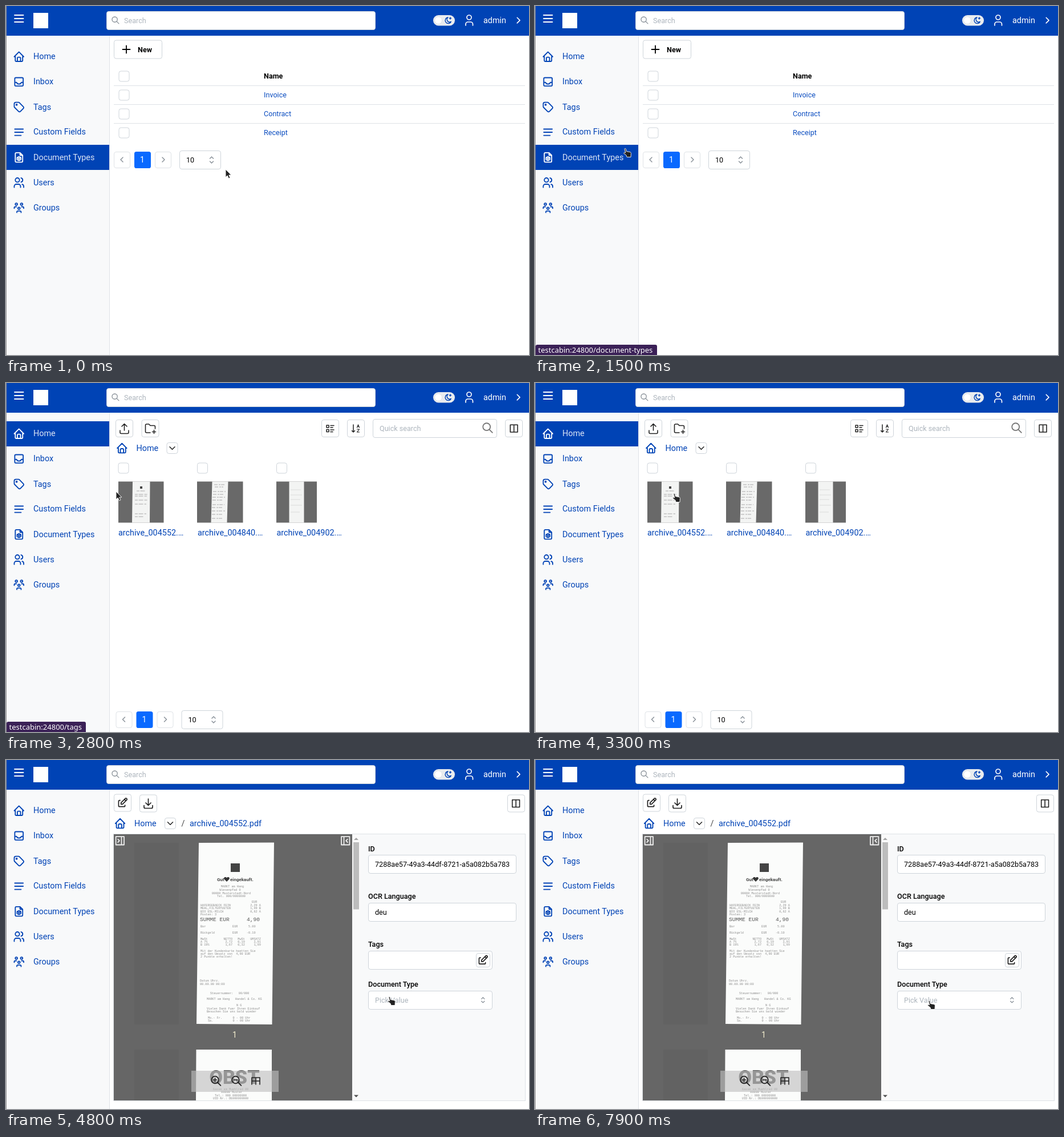
Animation of 917 by 611 pixels, one loop 8000 ms. Source, as an HTML page:

```html
<!DOCTYPE html>
<html lang="en">
<head>
<meta charset="utf-8">
<title>Document manager</title>
<style>
html, body { margin: 0; width: 100%; height: 100%; overflow: hidden; background: #fff; }
svg { display: block; width: 917px; height: 611px; }
text { font: 12.6px Roboto, sans-serif; fill: #000; white-space: pre; }
.nav text, .crumb text, .name { font-size: 14.4px; fill: #0043b5; }
.link { fill: #0b4dc0; }
.strong { font-weight: 700; }
.label text { font-weight: 500; }
.hint { fill: #adb5bd; }
.ico { fill: none; stroke-width: 2; stroke-linecap: round; stroke-linejoin: round; stroke: #222; }
.blue { stroke: #0043b5; }
.white { stroke: #fff; }
.box { fill: #fff; stroke: #ced4da; }
.faint { fill: #fff; stroke: #dee2e6; }
.rule { stroke: #dee2e6; }
.active rect { fill: #0043b5; }
.active text { fill: #dbe4f5; }
.active .ico { stroke: #fff; }
.mid { text-anchor: middle; }
.paper text { font: 5.2px "Liberation Mono", monospace; fill: #8c8c8c; }
.paper .total { font-size: 9.6px; fill: #555; }
.paper .motto { font: 700 8px Roboto, sans-serif; fill: #444; }
.paper .brand { font: 900 34px Roboto, sans-serif; fill: #555; }
.status rect { fill: #3b2157; }
.status text { font: 13px "Noto Sans", sans-serif; fill: #fff; }

/* 1.25% of the loop is one 100 ms tick */
.show { visibility: hidden; animation: 8s step-end -5ms infinite; }
#docs { animation-name: docs; }
#files { animation-name: files; }
#viewer { animation-name: viewer; }
#u-docs { animation-name: u-docs; }
#u-fields { animation-name: u-fields; }
#u-tags { animation-name: u-tags; }
#u-inbox { animation-name: u-inbox; }
#u-home { animation-name: u-home; }
#arrow { animation-name: arrow; }
#hand { animation-name: hand; }
#cursor { animation: move 8s linear -5ms infinite; }

@keyframes docs { 0% { visibility: visible } 28.75%, to { visibility: hidden } }
@keyframes files { 0%, 45%, to { visibility: hidden } 28.75% { visibility: visible } }
@keyframes viewer { 0% { visibility: hidden } 45%, to { visibility: visible } }
@keyframes u-docs { 0%, 20%, to { visibility: hidden } 17.5% { visibility: visible } }
@keyframes u-fields { 0%, 22.5%, to { visibility: hidden } 20% { visibility: visible } }
@keyframes u-tags { 0%, 23.75%, 40%, to { visibility: hidden } 22.5%, 33.75% { visibility: visible } }
@keyframes u-inbox { 0%, 26.25%, 33.75%, to { visibility: hidden } 23.75%, 31.25% { visibility: visible } }
@keyframes u-home { 0%, 31.25%, to { visibility: hidden } 26.25% { visibility: visible } }
@keyframes arrow {
  0%, 35%, 45%, 71.25%, 77.5% { visibility: visible }
  11.25%, 36.25%, 60%, 73.75%, 97.5%, to { visibility: hidden }
}
@keyframes hand {
  0%, 35%, 45%, 71.25%, 77.5% { visibility: hidden }
  11.25%, 36.25%, 60%, 73.75%, 97.5%, to { visibility: visible }
}
@keyframes move {
  0% { transform: translate(385px, 286px); animation-timing-function: step-end }
  1.25% { transform: translate(385px, 286px); animation-timing-function: steps(5) }
  7.5% { transform: translate(240px, 262px); animation-timing-function: steps(4) }
  12.5% { transform: translate(158px, 246px); animation-timing-function: step-end }
  13.75% { transform: translate(149px, 245px); animation-timing-function: step-end }
  15% { transform: translate(157px, 249px); animation-timing-function: step-end }
  18.75% { transform: translate(157px, 249px); animation-timing-function: steps(7) }
  27.5% { transform: translate(96px, 71px); animation-timing-function: step-end }
  28.75% { transform: translate(96px, 72px); animation-timing-function: steps(5) }
  35% { transform: translate(193px, 190px); animation-timing-function: steps(3) }
  38.75% { transform: translate(236px, 196px); animation-timing-function: steps(2) }
  41.25% { transform: translate(243px, 193px); animation-timing-function: step-end }
  45% { transform: translate(243px, 193px); animation-timing-function: steps(8) }
  55% { transform: translate(601px, 362px); animation-timing-function: steps(4) }
  60% { transform: translate(671px, 414px); animation-timing-function: steps(5) }
  66.25% { transform: translate(672px, 416px); animation-timing-function: steps(5) }
  72.5% { transform: translate(690px, 448px); animation-timing-function: steps(2) }
  75% { transform: translate(660px, 425px); animation-timing-function: steps(2) }
  77.5% { transform: translate(625px, 418px); animation-timing-function: step-end }
  78.75% { transform: translate(421px, 215px); animation-timing-function: steps(3) }
  82.5% { transform: translate(279px, 72px); animation-timing-function: steps(5) }
  88.75% { transform: translate(516px, 352px); animation-timing-function: steps(4) }
  93.75% { transform: translate(640px, 500px); animation-timing-function: steps(2) }
  96.25% { transform: translate(692px, 440px); animation-timing-function: steps(2) }
  98.75%, to { transform: translate(690px, 421px); animation-timing-function: step-end }
}
</style>
</head>
<body>
<svg viewBox="0 0 917 611">
<defs>
  <path id="home" d="M5 12H3l9-9 9 9h-2M5 12v7a2 2 0 0 0 2 2h10a2 2 0 0 0 2-2v-7M9 21v-6a2 2 0 0 1 2-2h2a2 2 0 0 1 2 2v6"/>
  <path id="inbox" d="M4 6a2 2 0 0 1 2-2h12a2 2 0 0 1 2 2v12a2 2 0 0 1-2 2H6a2 2 0 0 1-2-2zM4 13h3l3 3h4l3-3h3"/>
  <path id="tag" d="M6.5 7.5a1 1 0 1 0 2 0a1 1 0 1 0-2 0M3 6v5.2a2 2 0 0 0 .6 1.4l7.7 7.7a2.4 2.4 0 0 0 3.4 0l5.6-5.6a2.4 2.4 0 0 0 0-3.4l-7.7-7.7A2 2 0 0 0 11.2 3H6a3 3 0 0 0-3 3z"/>
  <path id="lines" d="M4 6h16M4 12h16M4 18h12"/>
  <path id="file" d="M14 3v4a1 1 0 0 0 1 1h4M17 21H7a2 2 0 0 1-2-2V5a2 2 0 0 1 2-2h7l5 5v11a2 2 0 0 1-2 2zM12 10.5l3.5 1.8v3.7L12 17.8 8.5 16v-3.7zM8.5 12.3L12 14l3.5-1.7M12 14v3.8"/>
  <path id="users" d="M5 7a4 4 0 1 0 8 0a4 4 0 1 0-8 0M3 21v-2a4 4 0 0 1 4-4h4a4 4 0 0 1 4 4v2M16 3.1a4 4 0 0 1 0 7.8M21 21v-2a4 4 0 0 0-3-3.8"/>
  <path id="group" d="M10 13a2 2 0 1 0 4 0a2 2 0 0 0-4 0M8 21v-1a2 2 0 0 1 2-2h4a2 2 0 0 1 2 2v1M15 5a2 2 0 1 0 4 0a2 2 0 0 0-4 0M17 10h2a2 2 0 0 1 2 2v1M5 5a2 2 0 1 0 4 0a2 2 0 0 0-4 0M3 13v-1a2 2 0 0 1 2-2h2"/>
  <path id="glass" d="M3 10a7 7 0 1 0 14 0a7 7 0 1 0-14 0M21 21l-6-6"/>
  <path id="edit" d="M7 7H6a2 2 0 0 0-2 2v9a2 2 0 0 0 2 2h9a2 2 0 0 0 2-2v-1M20.4 6.6a2.1 2.1 0 0 0-3-3L9 12v3h3zM16 5l3 3"/>
  <path id="columns" d="M4 4h16v16H4zM12 4v16"/>
  <path id="panel" d="M4 4h16v16H4zM15 4v16M8 9l3 3-3 3"/>
  <path id="updown" d="M8 9l4-4 4 4M8 15l4 4 4-4"/>
  <path id="down" d="M6 9l6 6 6-6"/>
  <path id="right" d="M9 6l6 6-6 6"/>
  <rect id="check" class="box" width="18" height="18" rx="3.6"/>
  <rect id="btn" class="box" width="30" height="30" rx="3.6"/>
  <g id="pager">
    <rect class="faint" x="189.5" y="255.5" width="28" height="28" rx="3.6"/>
    <rect x="225" y="255" width="29" height="29" rx="3.6" fill="#0969ff"/>
    <rect class="faint" x="261.5" y="255.5" width="28" height="28" rx="3.6"/>
    <rect class="box" x="304.5" y="253.5" width="72" height="32" rx="3.6"/>
    <path class="ico" style="stroke:#868e96;stroke-width:1.4" d="M205 265l-4 4 4 4M274 265l4 4-4 4M357.500 267l3-3 3 3M357.500 272l3 3 3-3"/>
    <text class="mid" x="239" y="273.500" style="fill:#fff;font-size:14px">1</text>
    <text x="316" y="273.500">10</text>
  </g>
</defs>

<rect width="917" height="611" fill="#fff"/>
<rect y="52" width="181" height="559" fill="#f8f9fa"/>
<path class="rule" d="M181.500 52v559"/>

<g class="nav">
  <text x="48" y="93">Home</text>
  <text x="48" y="137">Inbox</text>
  <text x="48" y="181.500">Tags</text>
  <text x="48" y="225">Custom Fields</text>
  <text x="48" y="269.500">Document Types</text>
  <text x="48" y="313.500">Users</text>
  <text x="48" y="358">Groups</text>
  <g class="ico blue">
    <use href="#home" transform="translate(11.700 77.700) scale(.92)"/>
    <use href="#inbox" transform="translate(11.700 121.800) scale(.92)"/>
    <use href="#tag" transform="translate(11.700 165.900) scale(.92)"/>
    <use href="#lines" transform="translate(11.700 210) scale(.92)"/>
    <use href="#file" transform="translate(11.700 254.100) scale(.92)"/>
    <use href="#users" transform="translate(11.700 298.200) scale(.92)"/>
    <use href="#group" transform="translate(11.700 342.300) scale(.92)"/>
  </g>
</g>

<g id="docs" class="show">
  <g class="nav active">
    <rect x="1" y="243" width="180" height="44"/>
    <text x="48" y="269.500">Document Types</text>
    <use class="ico" href="#file" transform="translate(11.700 254.100) scale(.92)"/>
  </g>
  <rect class="box" x="189.500" y="60" width="84" height="32" rx="3.600"/>
  <path class="ico" style="stroke:#000;stroke-width:1.800" d="M204.500 76h13M211 69.500v13"/>
  <text x="231" y="80.500" class="strong">New</text>
  <path class="rule" d="M189 139.500h721M189 172.500h721M189 205.500h721"/>
  <use href="#check" x="198" y="114"/>
  <use href="#check" x="198" y="147"/>
  <use href="#check" x="198" y="180"/>
  <use href="#check" x="198" y="213"/>
  <text x="452" y="126.500" class="strong">Name</text>
  <text x="452" y="160" class="link">Invoice</text>
  <text x="452" y="192.500" class="link">Contract</text>
  <text x="452" y="226" class="link">Receipt</text>
  <use href="#pager"/>
</g>

<g id="files" class="show">
  <g class="nav active">
    <rect x="1" y="67" width="180" height="44"/>
    <text x="48" y="93">Home</text>
    <use class="ico" href="#home" transform="translate(11.700 77.700) scale(.92)"/>
  </g>
  <use href="#btn" x="192.500" y="64.500"/>
  <use href="#btn" x="238" y="64.500"/>
  <use href="#btn" x="553.500" y="64.500"/>
  <use href="#btn" x="598.500" y="64.500"/>
  <use href="#btn" x="875.500" y="64.500"/>
  <rect class="box" x="643.500" y="63.500" width="217" height="32" rx="3.600"/>
  <text x="655" y="84" class="hint">Quick search</text>
  <g class="ico" stroke-width="1.600">
    <path style="stroke-width:1.600" d="M200 83v3.500a2 2 0 0 0 2 2h11a2 2 0 0 0 2-2V83M203 76l4.500-4.500 4.500 4.500M207.500 72v11"/>
    <path style="stroke-width:1.600" d="M253 87h-6.500a2 2 0 0 1-2-2V74a2 2 0 0 1 2-2h4l2.500 2.500h6.500a2 2 0 0 1 2 2V80M256.500 85.500h6M259.500 82.500v6"/>
    <path style="stroke-width:1.500" d="M562 74h4v4h-4zM562 81.500h4v4h-4zM569 74.500h6M569 78h4M569 82h6M569 85.500h4"/>
    <path style="stroke-width:1.500" d="M609 73v13M606.500 83.500l2.500 2.500 2.500-2.500"/>
    <path style="stroke-width:1.200" d="M615.500 78l2-5 2 5M616 76.500h3M615.500 81h4l-4 5h4"/>
    <use href="#glass" transform="translate(833.500 67.500) scale(.92)" style="stroke:#777"/>
    <use href="#columns" transform="translate(881 70) scale(.8)"/>
    <use href="#home" class="blue" transform="translate(192.300 103) scale(.92)"/>
  </g>
  <g class="crumb"><text x="228.500" y="118.500">Home</text></g>
  <rect class="box" x="282" y="104.500" width="19" height="19" rx="3.600"/>
  <use class="ico" href="#down" transform="translate(282.500 105) scale(.75)"/>
  <use href="#check" x="197" y="140"/>
  <use href="#check" x="335.500" y="140"/>
  <use href="#check" x="474.500" y="140"/>
  <g fill="#696969">
    <rect x="197" y="172.500" width="79.500" height="72"/>
    <rect x="335" y="172.500" width="80.500" height="72"/>
    <rect x="474" y="172.500" width="71" height="72"/>
  </g>
  <path fill="#f3f4f3" d="M222 172.500h30.500l-.500 72h-31zM361.500 172.500h28l-2 72h-28zM496.500 172.500h26v72h-26z"/>
  <g fill="none" stroke-width="1.200" stroke="#aaa">
    <path stroke-dasharray="5 1.500 8 2" d="M229 189h16M226 195h23M226 198h21M226 205h22M226 212h20M226 229h20M226 234h16"/>
    <path stroke-dasharray="6 2 3 1" d="M365 178h19M366 182h15M363 190h22M363 195h20M362 200h22M362 205h17M362 213h21M361 218h19M361 224h23M361 230h20M361 237h18"/>
    <path stroke="#dcdcdc" d="M499 187h18M499 196h20M499 204h17M499 214h20M499 226h16"/>
  </g>
  <rect x="235" y="181" width="4" height="4" fill="#444"/>
  <text class="name" x="197" y="267">archive_004552.…</text>
  <text class="name" x="336" y="267">archive_004840.…</text>
  <text class="name" x="474.500" y="267">archive_004902.…</text>
  <use href="#pager" x="3.500" y="320"/>
</g>

<g id="viewer" class="show">
  <use href="#btn" x="189.500" y="60"/>
  <use href="#btn" x="234.500" y="61"/>
  <use href="#btn" x="879.500" y="61"/>
  <g class="ico">
    <use href="#edit" transform="translate(194 64.500) scale(.86)"/>
    <path style="stroke-width:1.700" d="M242 79.500v3a2 2 0 0 0 2 2h11a2 2 0 0 0 2-2v-3M245 75l4.500 4.500L254 75M249.500 68v11"/>
    <use href="#columns" transform="translate(884.500 66.500) scale(.8)"/>
    <use href="#home" class="blue" transform="translate(189 100) scale(.92)"/>
  </g>
  <rect class="box" x="278.500" y="101.500" width="19" height="19" rx="3.600"/>
  <use class="ico" href="#down" transform="translate(279 102) scale(.75)"/>
  <g class="crumb">
    <text x="225" y="116">Home</text>
    <text x="307.500" y="116" style="fill:#444">/</text>
    <text x="322" y="116">archive_004552.pdf</text>
  </g>
  <rect x="188.500" y="129.500" width="722" height="467" fill="#f8f9fa" stroke="#dee2e6"/>
  <rect x="189" y="130" width="418" height="466" fill="#666"/>
  <path fill="#626262" d="M225 145h78v318h-78zM225 507h78v89h-78z"/>
  <g class="ico" style="stroke:#eee">
    <use href="#panel" transform="translate(189 130.500) scale(.9)"/>
    <use href="#panel" transform="translate(606 130.500) scale(-.9 .9)"/>
  </g>

  <g class="paper">
    <path fill="#fbfcfb" d="M338 145l132-.5-3.500 318.500-132.500-1zM333.500 507h132.500v89H333z"/>
    <rect x="394" y="181" width="16" height="15" fill="#444"/>
    <text class="motto" x="370" y="211.500">Gut</text>
    <path fill="#333" d="M387 213l-4.500-4.500c-1.500-3 2.500-5 4.500-2 2-3 6-1 4.500 2z"/>
    <text class="motto" x="393" y="211.500">eingekauft.</text>
    <g class="mid">
      <text x="397" y="222.500">MARKT am Hang</text>
      <text x="393" y="228.500">Wiesenpfad 0</text>
      <text x="395" y="234.500">00000 Musterstadt-Nord</text>
      <text x="395" y="240">Tel. 000/0000000</text>
    </g>
    <text x="431" y="250">EUR</text>
    <text x="341" y="255.500">HAFERGEBAECK FEIN           2,29 A</text>
    <text x="341" y="261">MEHL,FILTERTUETEN           1,99 B</text>
    <text x="341" y="266.500">BIO ESL-MILCH               0,62 A</text>
    <text x="341" y="271.500">Posten: 3</text>
    <text class="total" x="340" y="281.500">SUMME EUR</text>
    <text class="total" x="422" y="281.500">4,90</text>
    <text x="341" y="293">Bar               EUR      5.00</text>
    <text x="341" y="303.500">Rückgeld          EUR     -0.10</text>
    <text x="341" y="314.500">MwSt         NETTO   MwSt   UMSATZ</text>
    <text x="341" y="320">A 7%          2,72   0,19     2,91</text>
    <text x="341" y="325">B 19%         1,67   0,32     1,99</text>
    <text x="341" y="335.500">Mit der Kundenkarte haetten Sie</text>
    <text x="341" y="341">auf den Umsatz von  4,90 EUR</text>
    <text x="341" y="346">2 Punkte erhalten!</text>
    <text x="340" y="388">Datum Uhrz.</text>
    <text x="340" y="393.500">00.00.00 00:00</text>
    <text x="358" y="409.500">Steuernummer:   00/000</text>
    <text x="352" y="420">MARKT am Hang   Handel &amp; Co. KG</text>
    <text x="404" y="431">N G</text>
    <text x="352" y="436.500">Vielen Dank fuer Ihren Einkauf</text>
    <text x="352" y="442">Besuchen Sie uns bald wieder</text>
    <text x="354" y="452.500">Mo.- Fr.      0 - 00 Uhr</text>
    <text x="354" y="458">Sa.           0 - 00 Uhr</text>
    <text class="brand mid" x="400.500" y="567">OBST</text>
    <g class="mid" style="font-weight:700">
      <text x="394" y="577.500">Gasse am Muehlrad 00</text>
      <text x="396" y="583">00000 Muster</text>
      <text x="394" y="588.500">Tel.: 000 00000000</text>
      <text x="394" y="594">UID Nr.: DE000000000</text>
    </g>
  </g>
  <text class="mid" x="401" y="486" style="fill:#f5f0d0;font-size:14px">1</text>
  <rect x="325" y="544" width="153" height="37" fill="#bebebe" fill-opacity=".62"/>
  <g class="ico">
    <use href="#glass" transform="translate(357.500 551) scale(.9)"/>
    <use href="#glass" transform="translate(393.500 551) scale(.9)"/>
    <path style="stroke-width:1.600" d="M363.500 560h6M366.500 557v6M399.500 560h6M431 556v12M438 556v12M445 556v12M431 562h14M431 556h14"/>
  </g>

  <rect x="607" y="130" width="14" height="466" fill="#fafafa"/>
  <rect x="609" y="144" width="10" height="117.500" fill="#bdbdbd"/>
  <path fill="#a3a3a3" d="M610 140l4-4 4 4z"/>
  <path fill="#505050" d="M610 586.500h8l-4 4z"/>

  <g class="label">
    <text x="635" y="160">ID</text>
    <text x="635" y="243">OCR Language</text>
    <text x="635" y="327">Tags</text>
    <text x="635" y="396.500">Document Type</text>
  </g>
  <g class="box">
    <rect x="635.500" y="166.500" width="259" height="32" rx="3.600"/>
    <rect x="635.500" y="250.500" width="259" height="32" rx="3.600"/>
    <rect x="635.500" y="334.500" width="217" height="32" rx="3.600"/>
    <rect x="824.500" y="338.500" width="24" height="24" rx="3.600"/>
    <rect x="635.500" y="404.500" width="217" height="32" rx="3.600"/>
  </g>
  <text x="647" y="187">7288ae57-49a3-44df-8721-a5a082b5a783</text>
  <text x="647" y="271">deu</text>
  <text x="647" y="425" class="hint">Pick Value</text>
  <use class="ico" href="#edit" transform="translate(826 340) scale(.86)"/>
  <use class="ico" href="#updown" transform="translate(828.500 412.500) scale(.65)" style="stroke:#868e96"/>
</g>

<rect width="917" height="52" fill="#0043b5"/>
<path class="ico white" d="M15 16h15.500M15 22h15.500M15 28h15.500" style="stroke-width:1.800"/>
<rect x="48" y="12" width="26" height="27" fill="#fff"/>
<rect class="box" x="176.500" y="9.500" width="471" height="32" rx="3.600"/>
<use class="ico" href="#glass" transform="translate(184 17) scale(.66)" style="stroke:#868e96"/>
<text x="207" y="29.500" class="hint">Search</text>
<rect x="749" y="16" width="38" height="18.500" rx="9.200" fill="#e9ecef"/>
<circle cx="758" cy="25.200" r="6.500" fill="#fff" stroke="#dee2e6"/>
<path class="ico blue" style="stroke-width:1.500" d="M775 20a5.300 5.300 0 1 0 5.300 7.500a4.600 4.600 0 0 1-5.300-7.500zM779 20v3M777.500 21.500h3"/>
<path class="ico white" style="stroke-width:1.700" d="M808 20a4 4 0 1 0 8 0a4 4 0 1 0-8 0M806 34v-2a4 4 0 0 1 4-4h4.500a4 4 0 0 1 4 4v2"/>
<text x="837" y="30" style="fill:#fff;font-size:14.400px">admin</text>
<use class="ico white" href="#right" transform="translate(889 15.500) scale(.8)"/>
<path d="M.5 0v611" stroke="#949494"/>

<g class="status">
  <g id="u-docs" class="show"><rect x="1" y="593" width="213" height="21" rx="3"/><text x="5.500" y="607">testcabin:24800/document-types</text></g>
  <g id="u-fields" class="show"><rect x="1" y="593" width="202" height="21" rx="3"/><text x="5.500" y="607">testcabin:24800/custom-fields</text></g>
  <g id="u-tags" class="show"><rect x="1" y="593" width="139" height="21" rx="3"/><text x="5.500" y="607">testcabin:24800/tags</text></g>
  <g id="u-inbox" class="show"><rect x="1" y="593" width="147" height="21" rx="3"/><text x="5.500" y="607">testcabin:24800/inbox</text></g>
  <g id="u-home" class="show"><rect x="1" y="593" width="304" height="21" rx="3"/><text x="5.500" y="607">testcabin:24800/home/5d1c07be-92f4-4a0…</text></g>
</g>

<g id="cursor" fill="#222" stroke="#fff" stroke-width=".9" stroke-linejoin="round">
  <path id="arrow" class="show" d="M0 0v13.800l3.200-2.900 2.300 5 2.500-1.100-2.200-4.800h4.200z"/>
  <path id="hand" class="show" d="M0 1.500C0 .2 2 0 2.300 1.300l1 4.200L9 6.500c1.600.3 2.600 1.200 2.400 3L11 15.500H4.200L2.800 12l-3.800-2.800C-2 8 0 6.800 1 7.600l.8.400z"/>
</g>
</svg>
</body>
</html>
```
